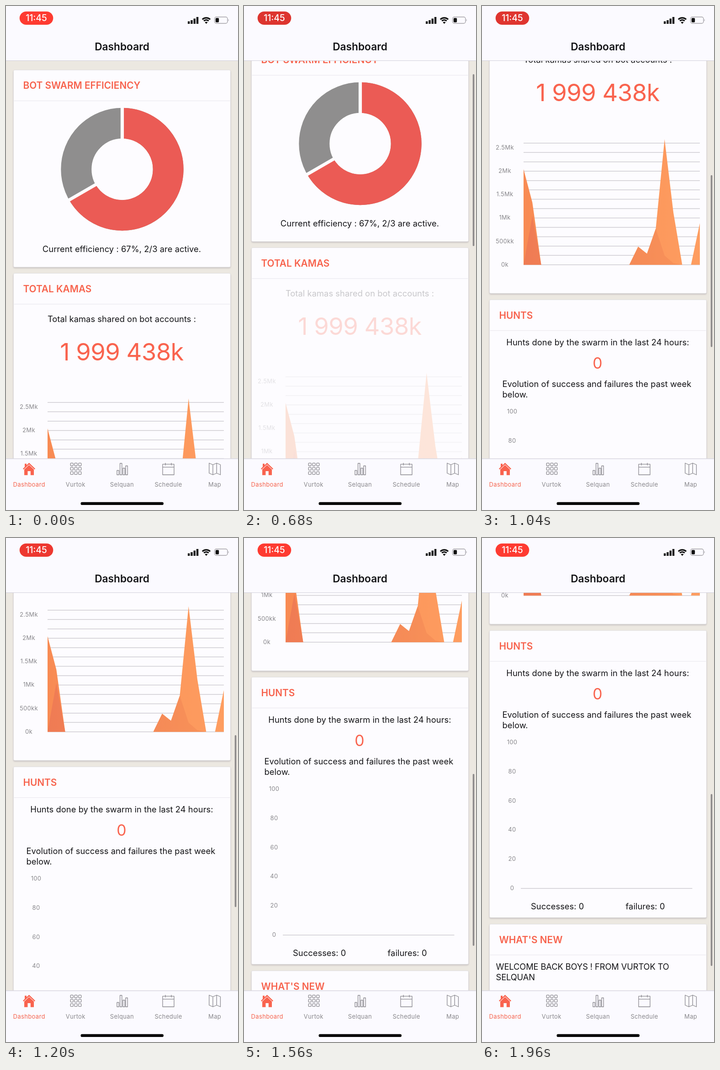
These frames come from a looping animation (508 px wide and 1102 px high, 2 s). An HTML page:

```html
<!DOCTYPE html>
<html lang="en">
<head>
<meta charset="utf-8">
<title>Dashboard</title>
<style>
  html, body { margin: 0; width: 100%; height: 100%; overflow: hidden; background: #fbfaff; }
  svg { display: block; width: 508px; height: 1102px; font-family: Inter, Roboto, sans-serif; }
  .card { fill: #fdfcff; stroke: #dedcdf; stroke-width: .8; filter: drop-shadow(0 2px 1.5px rgba(70, 60, 80, .22)); }
  .rule { stroke: #ebe9ef; stroke-width: 1.2; }
  .title { font-size: 20.8px; font-weight: 600; fill: #f7634d; }
  .body { font-size: 18.3px; letter-spacing: .07px; fill: #131316; }
  .caps { letter-spacing: -.1px; }
  .mid { text-anchor: middle; }
  .label { font-size: 13px; letter-spacing: .35px; fill: #88878b; text-anchor: middle; }
  .active { fill: #f5634c; }
  .coral { fill: #f9634e; }
  .grid { stroke: #cfcdd2; stroke-width: 1.5; }
  .edge { stroke: #d2d0da; stroke-width: 1.2; }
  .icon { fill: none; stroke: #8a898e; stroke-width: 1.3; stroke-linejoin: round; }
</style>
</head>
<body>
<svg viewBox="0 0 508 1102">
  <defs>
    <linearGradient id="upper">
      <stop offset="0" stop-color="#f88b53"/><stop offset="1" stop-color="#fe9d60"/>
    </linearGradient>
    <linearGradient id="lower">
      <stop offset="0" stop-color="#ef7b54"/><stop offset="1" stop-color="#f99459"/>
    </linearGradient>
  </defs>

  <rect width="508" height="1102" fill="#ece8e1"/>

  <g id="page">
    <g id="cards"></g>

    <g fill="none" stroke-width="67">
      <circle cx="254.5" cy="357" r="100.7" stroke="#8f8e8e"/>
      <path id="share" stroke="#eb5b55"/>
      <path id="gaps" stroke="#fdfcff" stroke-width="7.2"/>
    </g>
    <text class="body mid" x="253.5" y="538">Current efficiency : 67%, 2/3 are active.</text>

    <g id="kamas">
      <text class="body mid" x="253.5" y="690.5">Total kamas shared on bot accounts :</text>
      <text class="coral mid" x="253.5" y="775" font-size="52.6" letter-spacing="-.6">1 999 438k</text>
      <g id="kamasGrid"></g>
      <path id="upperArea" fill="url(#upper)"/>
      <path id="lowerArea" fill="url(#lower)"/>
    </g>

    <text class="body mid" x="253.5" y="1308.5">Hunts done by the swarm in the last 24 hours:</text>
    <text class="coral mid" x="253" y="1360" font-size="33.8">0</text>
    <text class="body" x="44.5" y="1399.6">Evolution of success and failures the past week</text>
    <text class="body" x="44.5" y="1422.6">below.</text>
    <g id="huntAxis"></g>
    <path class="grid" d="M85 1773.3H460.5"/>
    <text class="body" x="107" y="1818.7">Successes: 0</text>
    <text class="body" x="314.5" y="1818.7">failures: 0</text>

    <text class="body caps" x="30.5" y="1950.6">WELCOME BACK BOYS ! FROM VURTOK TO</text>
    <text class="body caps" x="30.5" y="1973.6">SELQUAN</text>
  </g>

  <rect id="bar" x="500.8" width="3.6" height="376" rx="1.8" fill="#8e8b8b"/>

  <!-- header -->
  <rect width="508" height="119.5" fill="#fbfaff"/>
  <path class="edge" d="M0 119.5H508"/>
  <rect id="pill" x="29.7" y="12" width="73.6" height="29" rx="14.5"/>
  <text class="mid" x="66.5" y="33.3" font-size="19.5" font-weight="500" fill="#fff">11:45</text>
  <path d="M398 39v-5.5h4.4v5.5zM404.3 39v-8h4.4v8zM410.6 39v-11.5h4.4v11.5zM416.9 39v-15h4.4v15z" fill="#111"/>
  <path d="M429.9 29.4A12.2 12.2 0 0 1 447.1 29.4M433.2 32.7A7.5 7.5 0 0 1 443.8 32.7" fill="none" stroke="#111" stroke-width="3.1"/>
  <path d="M438.5 39l-3.1-3.2a4.4 4.4 0 0 1 6.2 0z" fill="#111"/>
  <rect x="456.6" y="24" width="28.4" height="14" rx="4" fill="none" stroke="#a5a3a8" stroke-width="1.4"/>
  <rect x="458.8" y="26.2" width="7.4" height="9.6" rx="1.8" fill="#111"/>
  <path d="M486.6 28.6q2.6 2.4 0 4.8z" fill="#a5a3a8"/>
  <text class="mid" x="254" y="97.3" font-size="22.7" font-weight="600" fill="#131316">Dashboard</text>

  <!-- tab bar -->
  <rect y="989.5" width="508" height="112.5" fill="#fbfaff"/>
  <path class="edge" d="M0 989.8H508"/>
  <g id="tabs"></g>
  <path class="coral" d="M50.5 998.8L45 1004V1000.8H41V1007.8L37 1011.7 38.6 1013.4 50.5 1002.2 62.4 1013.4 64 1011.7Z"/>
  <path class="coral" d="M50.5 1003.6L61 1013.4V1025.8H53.8V1017H47.4V1025.8H40V1013.4Z"/>
  <g id="dots" class="icon"></g>
  <path class="icon" d="M243 1025v-9.5h4.2v9.5zM249.6 1025v-25h4.2v25zM256 1025v-14.5h4.2v14.5zM262 1025v-19.5h4.2v19.5z"/>
  <path class="icon" d="M343 1001.8H368V1025H343zM343 1008.3H368M349 999v5.5M362 999v5.5"/>
  <path class="icon" d="M444.8 999.5L453 1003 461.3 999.5 469.5 1003V1025L461.3 1021.5 453 1025 444.8 1021.5ZM453 1003V1025M461.3 999.5V1021.5"/>
  <rect x="163.5" y="1084.8" width="181.5" height="6.2" rx="3.1" fill="#050505"/>
</svg>

<script>
const LOOP = 2000, STEP = 40;
const $ = id => document.getElementById(id);
const fill = (id, items, draw) => { $(id).innerHTML = items.map(draw).join(""); };
const range = n => Array.from({ length: n }, (_, i) => i);
const label = (text, x, y, extra = "") => `<text class="label ${extra}" x="${x}" y="${y}">${text}</text>`;
const clamp = v => Math.min(1, Math.max(0, v));

fill("cards", [
  ["BOT SWARM EFFICIENCY", 140, 571],
  ["TOTAL KAMAS", 584.5, 1195.3],
  ["HUNTS", 1209.3, 1837],
  ["WHAT'S NEW", 1851.3, 2100]
], ([name, top, bottom]) =>
  `<rect class="card" x="16.5" y="${top}" width="475" height="${bottom - top}" rx="2.5"/>
   <path class="rule" d="M17.5 ${top + 67.3}H490.5"/>
   <text class="title" x="37.5" y="${top + 41.4}">${name}</text>`);

// Donut: two thirds clockwise from the top
const onRing = (turn, r) => {
  const a = turn * 2 * Math.PI;
  return `${254.5 + r * Math.sin(a)} ${357 - r * Math.cos(a)}`;
};
$("share").setAttribute("d", `M${onRing(0, 100.7)}A100.7 100.7 0 1 1 ${onRing(2 / 3, 100.7)}`);
$("gaps").setAttribute("d", [0, 2 / 3].map(t => `M${onRing(t, 64)}L${onRing(t, 137)}`).join(""));

// Kamas chart
const BASE = 1132.8;
fill("kamasGrid", range(14), i => `<path class="grid" d="M91 ${BASE - i * 20.46}H477"/>`);
$("kamasGrid").innerHTML += ["0k", "500kk", "1Mk", "1.5Mk", "2Mk", "2.5Mk"]
  .map((text, i) => label(text, 50, 1136.7 - i * 51.2)).join("");

const area = heights => {
  const top = range(21).map(i => `L${91 + i * 19.3} ${BASE - (heights[i] || 0)}`);
  return `M91 ${BASE}${top.join("")}V${BASE}Z`;
};
const shared = { 13: 39.5, 14: 24, 15: 79 };
$("upperArea").setAttribute("d", area({ ...shared, 0: 209, 1: 136, 16: 274.5, 17: 114, 20: 91 }));
$("lowerArea").setAttribute("d", area({ ...shared, 1: 107, 16: 20, 17: 3.5 }));

fill("huntAxis", range(6), i => label(i * 20, 66, 1777 - i * 63.8));
fill("tabs", ["Dashboard", "Vurtok", "Selquan", "Schedule", "Map"],
  (name, i) => label(name, 50.7 + i * 101.6, 1050.6, i ? "" : "active"));
fill("dots", range(9), i =>
  `<rect x="${141.2 + i % 3 * 8.8}" y="${999.3 + Math.floor(i / 3) * 9.4}" width="6" height="6.2" rx="1.4"/>`);

// Finger drag, then momentum decay
function scrollAt(t) {
  if (t < 580) return 0;
  if (t < 760) return 56 * ((t - 580) / 100) ** 1.977;
  return 567 + 526.2 * (1 - Math.exp((1040 - t) / 507));
}

function render(t) {
  const scroll = Math.round(scrollAt(t));
  $("page").setAttribute("transform", `translate(0 ${-scroll})`);
  $("bar").setAttribute("y", 124.8 + scroll * .432);
  $("bar").setAttribute("opacity", t < 600 ? 0 : 1);
  $("kamas").setAttribute("opacity", t < 600 ? 1 : clamp((t - 600) / 360));
  const dim = clamp(.4 + .9 * Math.cos((t - 740) / 1000 * Math.PI));
  $("pill").setAttribute("fill", `rgb(${254 - 33 * dim},${59 - 6 * dim},${49 - 2 * dim})`);
}

const start = performance.now();
function tick() {
  const t = (performance.now() - start) % LOOP;
  render(Math.floor(t / STEP) * STEP);
  requestAnimationFrame(tick);
}
tick();
</script>
</body>
</html>
```
